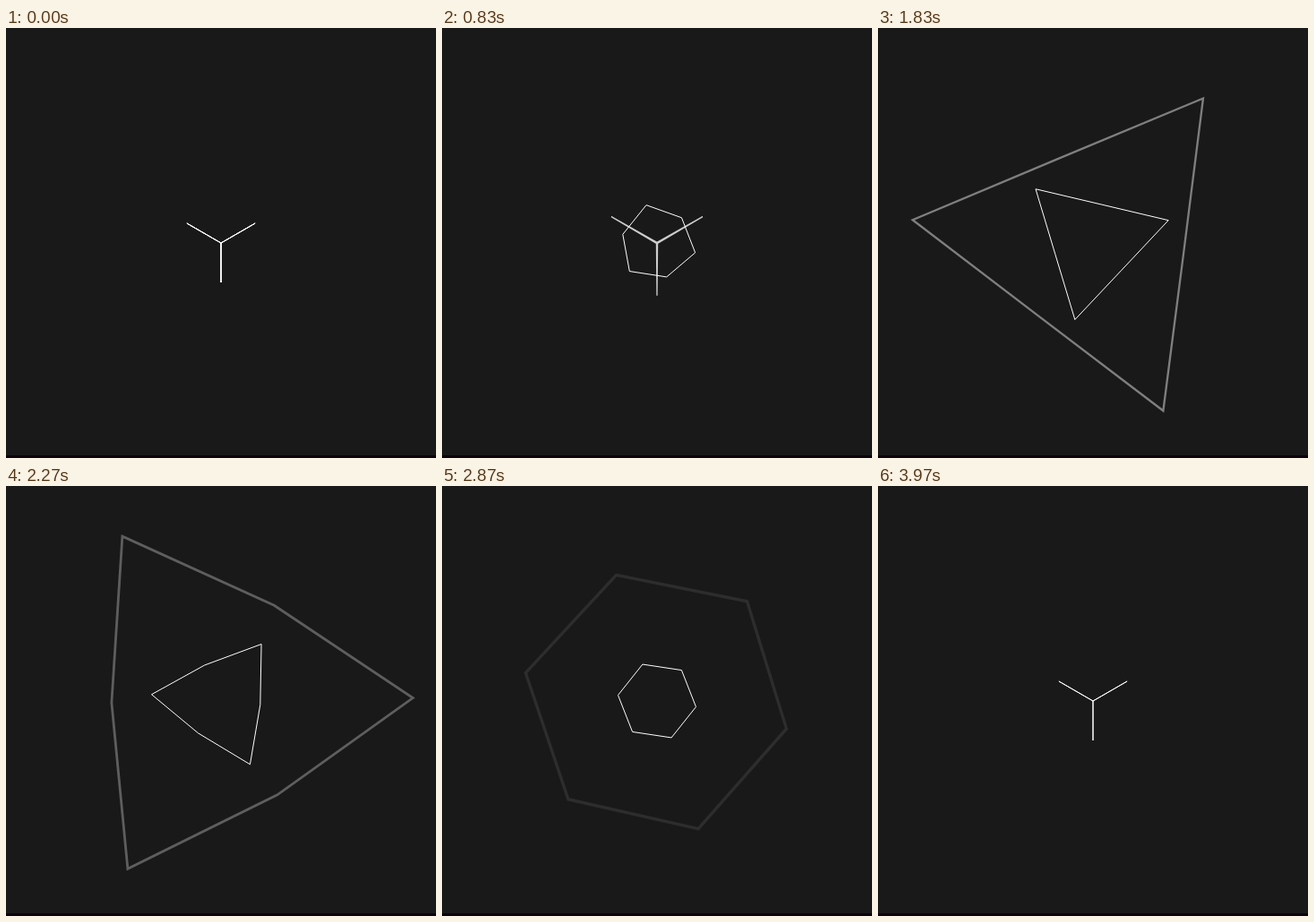
These frames come from a looping animation (480 px wide and 480 px high, 4.01 s). An HTML page with a canvas:

```html
<!DOCTYPE html>
<html lang="en">
<head>
<meta charset="utf-8">
<title>Morphing star</title>
<style>
html, body { margin: 0; width: 100%; height: 100%; overflow: hidden; background: #191919; }
canvas { display: block; }
</style>
</head>
<body>
<canvas id="stage" width="480" height="480"></canvas>
<script>
const ctx = document.getElementById('stage').getContext('2d');
const LOOP = 4010, LAST = 95, RADIUS = 44;

// smooth ease from 0 to 1 between steps a and b
function ease(step, a, b) {
  const u = Math.min(1, Math.max(0, (step - a) / (b - a)));
  return u * u * (3 - 2 * u);
}

// 24 steps per second, shown on a 30 Hz grid of 10 ms ticks
function stepAt(ms) {
  const tick = Math.floor(ms / 10) * 10;
  const slot = Math.floor((tick + 4) * 3 / 100);
  return Math.min(LAST, Math.floor(slot * 0.8 + 0.3));
}

// six corners: three fixed arms, three that grow from 0 to twice the radius
function star(scale, growth, turn, alpha) {
  if (alpha <= 0) return;
  ctx.save();
  ctx.translate(240, 240);
  ctx.scale(scale, scale);
  ctx.globalAlpha = alpha;
  ctx.beginPath();
  for (let n = 0; n < 6; n++) {
    const r = n % 2 ? 2 * RADIUS * growth : RADIUS;
    const angle = -(30 + turn * 360 + n * 60) * Math.PI / 180;
    ctx.lineTo(r * Math.cos(angle), r * Math.sin(angle));
  }
  ctx.closePath();
  ctx.stroke();
  ctx.restore();
}

function draw() {
  const i = stepAt(performance.now() % LOOP);
  const pulse = (start, peak) => ease(i, start, peak) - ease(i, peak, LAST);

  ctx.fillStyle = '#191919';
  ctx.fillRect(0, 0, 480, 480);
  ctx.fillStyle = '#0c030b';
  ctx.fillRect(0, 477, 480, 3);

  ctx.strokeStyle = '#fff';
  ctx.lineWidth = 1;
  ctx.miterLimit = 4;
  star(1 + 2.95 * ease(i, 0, LAST), pulse(19, 42.5), ease(i, 21, LAST), Math.min(1, (75 - i) / 70));
  star(1, pulse(0, 43), i / LAST, 1);
  requestAnimationFrame(draw);
}
draw();
</script>
</body>
</html>
```
